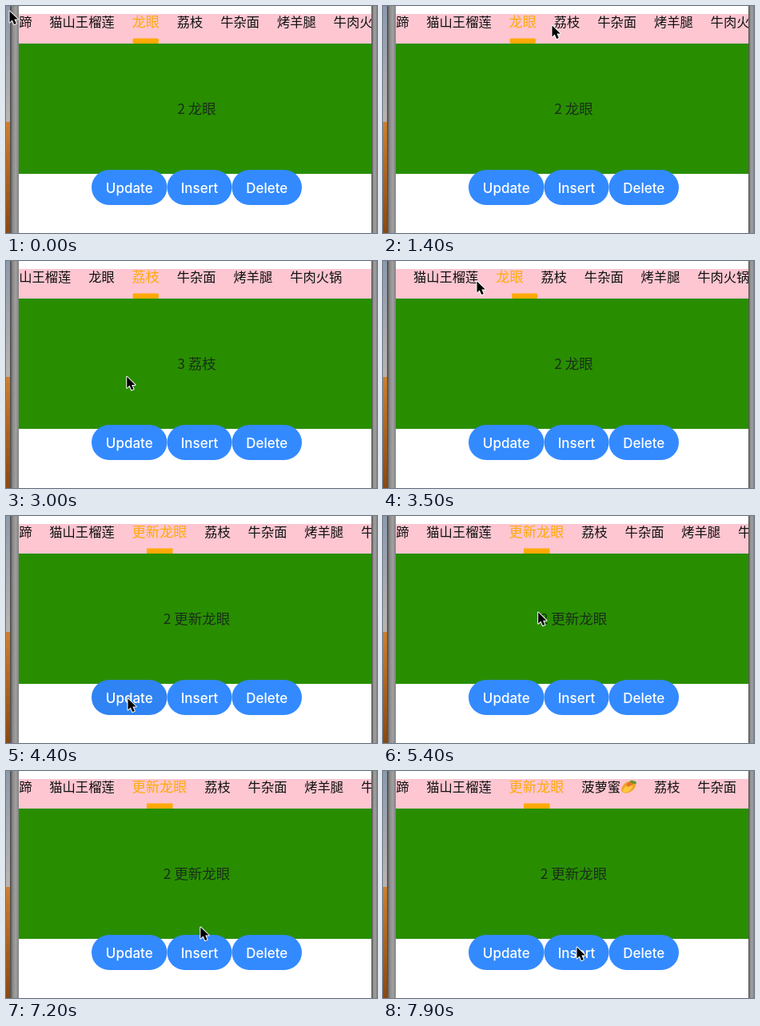
An HTML page with a canvas for the animation above (8 s loop, 464x284 px).

```html
<!DOCTYPE html>
<html lang="zh">
<head>
<meta charset="utf-8">
<style>
  html, body { margin: 0; width: 464px; height: 284px; overflow: hidden; background: #fff; }
  canvas { display: block; }
</style>
</head>
<body>
<canvas width="464" height="284"></canvas>
<script>
const ctx = document.querySelector('canvas').getContext('2d');
const LOOP = 8000, CJK = '"Noto Sans CJK SC", "Noto Sans CJK", sans-serif';
const LEFT = 16, RIGHT = 457, BAR_TOP = 10, BAR_BOTTOM = 47, PAGE_BOTTOM = 210;
const SIZE = 16.3, ACTIVE_SIZE = 17.2, GAP = 21.8, STEP = 2 * SIZE + GAP;

// Click times
const FORWARD = 2422, BACK = 3310, UPDATE = 4250, INSERT = 7550;

// Pointer glides; bow bends the path downwards
const glides = [
  { from: 0, to: 600, x: 328, y: 227 },
  { from: 800, to: 1400, x: 211, y: 24 },
  { from: 1450, to: 1600, x: 220, y: 23 },
  { from: 2600, to: 3250, x: 117, y: 25, bow: 140 },
  { from: 3800, to: 4200, x: 152, y: 228 },
  { from: 5000, to: 5800, x: 235, y: 13 },
  { from: 5900, to: 6200, x: 249, y: 20 },
  { from: 6500, to: 7400, x: 242, y: 220 }
];

function ease(k) {
  k = Math.min(1, Math.max(0, k));
  return k * k * (3 - 2 * k);
}

function rect(x, y, w, h, fill) {
  ctx.fillStyle = fill;
  ctx.fillRect(x, y, w, h);
}

function pill(x, y, w, h, r, fill) {
  ctx.fillStyle = fill;
  ctx.beginPath();
  ctx.roundRect(x, y, w, h, r);
  ctx.fill();
}

function ellipse(x, y, rx, ry, angle, fill) {
  ctx.fillStyle = fill;
  ctx.beginPath();
  ctx.ellipse(x, y, rx, ry, angle, 0, 7);
  ctx.fill();
}

function text(str, x, y, font, fill, align = 'left') {
  ctx.font = font;
  ctx.fillStyle = fill;
  ctx.textAlign = align;
  ctx.fillText(str, x, y);
}

function gradient(x0, x1, y1, colors) {
  const g = ctx.createLinearGradient(x0, 0, x1, y1);
  colors.forEach((color, i) => g.addColorStop(i / (colors.length - 1), color));
  return g;
}

function phoneFrame() {
  rect(0, 0, 6, 145, gradient(0, 0, 145, ['#8c9aae', '#b9b4b0']));
  rect(0, 145, 6, 139, gradient(0, 0, 284, ['#e0a050', '#d08030', '#8a4812']));
  for (const [x, w] of [[5, LEFT - 5], [RIGHT, 464 - RIGHT]]) {
    rect(x, 0, w, 284, gradient(x, x + w, 0, ['#4a4846', '#8d8d8d', '#a0a0a0', '#808080']));
  }
}

function mango(x, y) {
  ellipse(x, y, 10, 6.5, -0.6, '#f3a32a');
  ellipse(x - 1, y + 2, 7, 3.5, -0.6, '#fcc740');
  ellipse(x + 2, y - 4, 5, 2.5, -0.5, '#e8752c');
  ellipse(x + 6, y - 6, 4, 1.8, 0.3, '#5b9a32');
}

function tabBar(t, tabs, selected) {
  const scroll = ease((t - FORWARD) / 300) - ease((t - BACK) / 300);
  ctx.save();
  ctx.beginPath();
  ctx.rect(LEFT, BAR_TOP, RIGHT - LEFT, BAR_BOTTOM - BAR_TOP);
  ctx.clip();
  rect(LEFT, BAR_TOP, RIGHT - LEFT, BAR_BOTTOM - BAR_TOP, '#fdc6d1');

  let x = 54.3 - STEP * scroll;
  text('猪蹄', x - GAP, 25.7, `${SIZE}px ${CJK}`, '#111', 'right');
  for (const name of tabs) {
    const active = name === selected, size = active ? ACTIVE_SIZE : SIZE;
    text(name, x, 25.7, `${active ? 500 : 400} ${size}px ${CJK}`, active ? '#ffaa0a' : '#111');
    x += name.length * size;
    if (name === '菠萝蜜') {
      mango(x + 10, 20);
      x += 20;
    }
    x += GAP;
  }

  // The marker trails slightly behind the scrolling labels
  const lag = 12 * scroll * (1 - scroll) * (t < BACK ? -1 : 1);
  const updated = t >= UPDATE;
  pill((updated ? 176 : 158.5) + lag, 40.5, 32.5, 6.5, updated ? 0 : 2, '#ffa906');
  ctx.restore();
}

function button(label, x, w, t, click) {
  pill(x, 205, w, 44, 22, '#338aff');
  const press = ease((t - click + 100) / 100) - ease((t - click) / 300);
  if (press > 0) pill(x, 205, w, 44, 22, `rgba(0, 0, 0, ${press / 10})`);
  text(label, x + w / 2, 233.5, '500 17px Inter, sans-serif', '#fff', 'center');
}

function pointer(t) {
  let x = 4, y = 6;
  for (const g of glides) {
    const k = ease((t - g.from) / (g.to - g.from));
    x += (g.x - x) * k;
    y += (g.y - y) * k + (g.bow || 0) * Math.sin(Math.PI * k);
  }
  const arrow = new Path2D('M.5 .5V14.5L3.8 11.5L6.2 17L8.8 15.9L6.4 10.6H10.8Z');
  ctx.save();
  ctx.translate(x, y);
  ctx.lineWidth = 2;
  ctx.lineJoin = 'round';
  ctx.strokeStyle = '#fff';
  ctx.stroke(arrow);
  ctx.fillStyle = '#000';
  ctx.fill(arrow);
  ctx.restore();
}

function draw(now) {
  const t = now % LOOP;
  const longan = t >= UPDATE ? '更新龙眼' : '龙眼';
  const onNext = t >= FORWARD && t < BACK;
  const selected = onNext ? '荔枝' : longan;
  const inserted = t >= INSERT ? ['菠萝蜜'] : [];
  const tabs = ['猫山王榴莲', longan, ...inserted, '荔枝', '牛杂面', '烤羊腿', '牛肉火锅'];

  rect(0, 0, 464, 284, '#fff');
  tabBar(t, tabs, selected);
  rect(LEFT, BAR_BOTTOM, RIGHT - LEFT, PAGE_BOTTOM - BAR_BOTTOM, '#288e00');
  text(`${onNext ? 3 : 2} ${selected}`, 238.5, 135, `17.5px ${CJK}`, '#1a2f18', 'center');
  button('Update', 107, 94.5, t, UPDATE);
  button('Insert', 201.5, 81, t, INSERT);
  button('Delete', 282.5, 87.5, t, Infinity);
  phoneFrame();
  pointer(t);
  requestAnimationFrame(draw);
}
requestAnimationFrame(draw);
</script>
</body>
</html>
```
